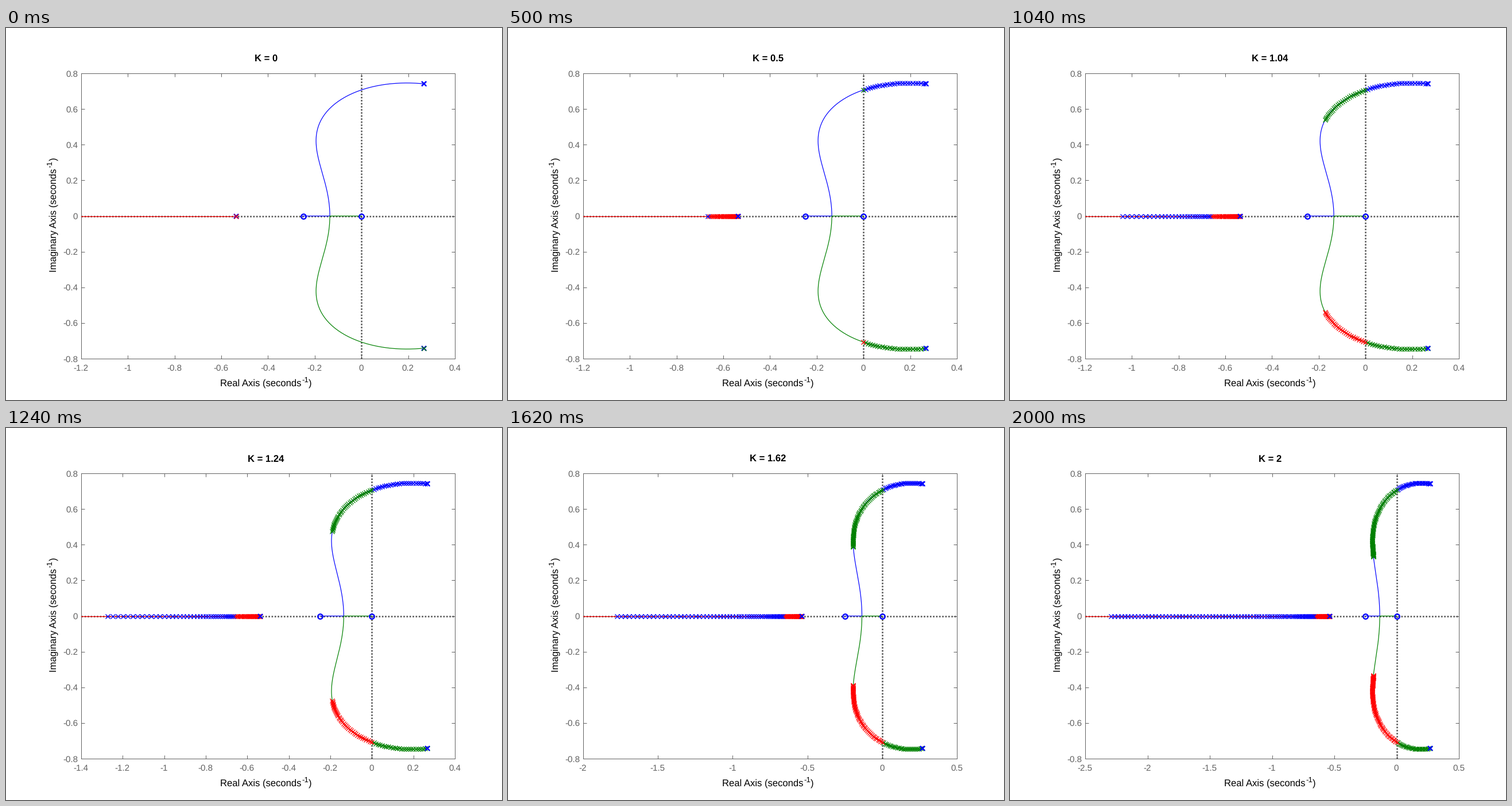
A matplotlib script for the animation above (2.02 s loop, 864 px wide and 648 px high).

```python
import matplotlib.pyplot as plt
import numpy as np
from matplotlib.animation import FuncAnimation

W, H, DPI = 864, 648, 72            # at 72 dpi one point is one pixel
LEFT, RIGHT, TOP, BOTTOM = 131, 782, 79, 576
FRAMES, STEP = 101, 0.02
BLUE, GREEN, RED, GRAY = "#0000ff", "#008000", "#ff0000", "#626262"
TICK_SIZE, LABEL_SIZE = 15.15, 16.67

plt.rcParams.update({"font.family": "Liberation Sans", "text.hinting": "none",
                     "axes.unicode_minus": False})


def poles(k):
    """Closed-loop poles of 3s^3 + s + 1 + K(4s^2 + s): real, upper, lower."""
    r = np.roots([3, 4 * k, 1 + k, 1])
    r = r[np.argsort(r.imag)]
    return np.array([r[1].real + 0j, r[2], r[0]])


gains = np.arange(FRAMES) * STEP
track = np.array([poles(k) for k in gains])
crossing = int(round(0.5 / STEP))   # the root order flips here

fig = plt.figure(figsize=(W / DPI, H / DPI), dpi=DPI, facecolor="white")
ax = fig.add_axes([LEFT / W, 1 - BOTTOM / H, (RIGHT - LEFT) / W, (BOTTOM - TOP) / H])
ax.set_ylim(-0.8, 0.8)
ax.set_yticks(np.linspace(-0.8, 0.8, 9))
ax.tick_params(direction="in", length=6, width=1, color=GRAY, top=True, right=True,
               labelleft=False, labelbottom=False)
for spine in ax.spines.values():
    spine.set(color=GRAY, linewidth=1)


def text(x, y, s, size=LABEL_SIZE, **kw):
    return fig.text(x / W, 1 - y / H, s, fontsize=size, va="baseline", **kw)


def number(v):
    return f"{round(v, 2) + 0:g}"


def axis_label(x, y, words, ends, vertical=False):
    """Label with a raised exponent; ends are the offsets of '-1' and ')'."""
    parts = [(0, 0, words, 1), (ends[0], 6.7, "-1", 0.8), (ends[1], 0, ")", 1)]
    for along, up, s, scale in parts:
        dx, dy = (-up, -along) if vertical else (along, -up)
        text(x + dx, y + dy, s, LABEL_SIZE * scale,
             rotation=90 if vertical else 0, rotation_mode="anchor")


axis_label(372.6, 623.5, "Real Axis (seconds", (142.7, 154.6))
axis_label(87.2, 424.8, "Imaginary Axis (seconds", (181.6, 193.5), vertical=True)
title = text(453, 58.7, "", weight="bold", ha="center")
for v in np.linspace(-0.8, 0.8, 9):
    y = (TOP + BOTTOM) / 2 - v / 1.6 * (BOTTOM - TOP)
    text(125, y + 5.4, number(v), TICK_SIZE, ha="right", color=GRAY)
x_labels = [text(0, 596.8, "", TICK_SIZE, ha="center", color=GRAY) for _ in range(11)]

# zero lines
dots = dict(color="#5c5c5c", linewidth=2.67, linestyle=(0, (1, 1)), zorder=2)
ax.axhline(0, **dots)
ax.axvline(0, **dots)

# full locus, up to and past the breakaway point
quartic = np.roots([12, 6, -4, -8, -1])
meet = min(quartic, key=lambda s: abs(s + 0.135)).real
k_meet = -(3 * meet**3 + meet + 1) / (4 * meet**2 + meet)
arc = [poles(k)[1] for k in k_meet * np.linspace(0, 0.995, 160) ** 2]
arc_x = np.append(np.real(arc), meet)
arc_y = np.append(np.imag(arc), 0)
thin = dict(linewidth=1.2, zorder=3)
ax.plot(np.append(arc_x, -0.25), np.append(arc_y, 0), color=BLUE, **thin)
ax.plot(np.append(arc_x, 0), np.append(-arc_y, 0), color=GREEN, **thin)
ax.plot([track[0, 0].real, -6], [0, 0], color=RED, **thin)

ax.plot([-0.25, 0], [0, 0], "o", color=BLUE, mfc="none", ms=8.5, mew=2.3, zorder=4)
start, = ax.plot(track[0].real, track[0].imag, "x", color=BLUE, ms=7.5, mew=2.4)


def crosses(color):
    return ax.plot([], [], "x", color=color, ms=7.5, mew=1.3, zorder=5)[0]


early = [crosses(c) for c in (RED, BLUE, GREEN)]
late = [crosses(c) for c in (BLUE, GREEN, RED)]


def set_x_axis(reach):
    lo = next(v for v in (-1.2, -1.4, -1.6, -2, -2.5) if v <= reach * 1.022)
    hi, step = (0.4, 0.2) if lo >= -1.6 else (0.5, 0.5)
    ticks = np.arange(lo, hi + step / 2, step)
    ax.set_xticks(ticks)
    ax.set_xlim(lo, hi)
    for i, label in enumerate(x_labels):
        if i < len(ticks):
            x = LEFT + (ticks[i] - lo) / (hi - lo) * (RIGHT - LEFT)
            label.set_x((x - 0.5) / W)
            label.set_text(number(ticks[i]))
        else:
            label.set_text("")


def update(n):
    title.set_text(f"K = {number(gains[n])}")
    set_x_axis(track[n, 0].real)
    start.set_zorder(6 if n else 4)
    for j in range(3):
        first = track[:min(n + 1, crossing), j]
        rest = track[crossing:n + 1, j]
        early[j].set_data(first.real, first.imag)
        late[j].set_data(rest.real, rest.imag)
    return [title, start, *early, *late, *x_labels]


anim = FuncAnimation(fig, update, frames=FRAMES, init_func=lambda: update(0),
                     interval=20, repeat=True, repeat_delay=0, blit=False)
plt.show()
```
